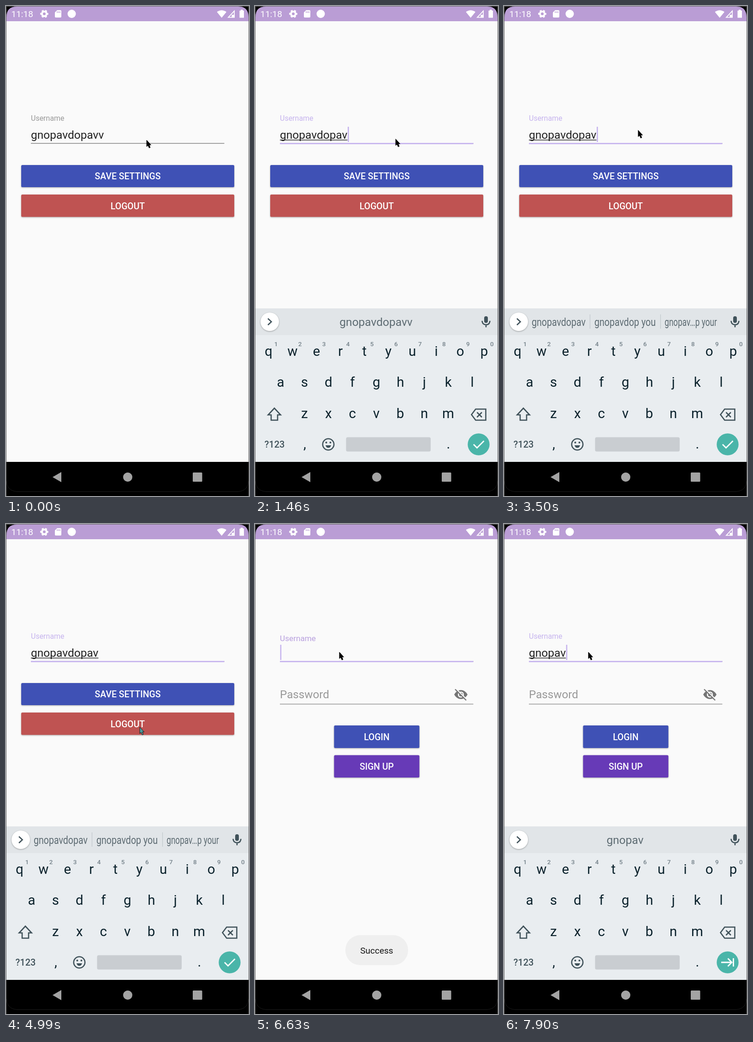
Animation of 527 by 1063 pixels, one loop 8000 ms. Source, as an HTML page:

```html
<!DOCTYPE html>
<html lang="en">
<head>
<meta charset="utf-8">
<title>Account settings</title>
<style>
  html, body { margin: 0; height: 100%; overflow: hidden; background: #000; }
  svg { display: block; width: 100%; height: 100%; font-family: Roboto, sans-serif; }
  .mid { text-anchor: middle; }
  .button { filter: drop-shadow(0 1.5px 1.5px rgba(0, 0, 0, .32)); }
  .caption { fill: #fff; font-size: 19.4px; font-weight: 500; text-anchor: middle; }
  .hint { fill: #999; font-size: 24.2px; }
  .icon { fill: none; stroke: #40525a; stroke-width: 2.6; }
  .key { fill: #0b222c; font-size: 29.5px; text-anchor: middle; }
  .digit { fill: #75828a; font-size: 13.5px; font-weight: 500; text-anchor: middle; }
  .suggestion { fill: #5d6b72; font-size: 24.5px; text-anchor: middle; }
</style>
</head>
<body>
<svg viewBox="0 0 527 1063">
  <defs>
    <clipPath id="screen"><path d="M1 1063V24Q1 1 24 1H503Q526 1 526 24V1063Z"/></clipPath>
    <clipPath id="aboveNav"><path d="M1 33H526V989H1Z"/></clipPath>
    <clipPath id="saveShape"><rect x="33" y="345" width="462" height="48" rx="2.5"/></clipPath>
    <clipPath id="logoutShape"><rect x="33" y="409" width="462" height="48.5" rx="2.5"/></clipPath>
  </defs>
  <rect width="527" height="1063"/>
  <g clip-path="url(#screen)">
    <path d="M0 0H527V511H0Z" fill="#ba9dd5"/>
    <rect id="paper" x="1" y="33" width="525" height="956" fill="#fafafa"/>

    <g id="content">
      <g id="settings">
        <rect id="save" class="button" x="33" y="345" width="462" height="48" rx="2.5" fill="#3f51b5"/>
        <rect class="button" x="33" y="409" width="462" height="48.5" rx="2.5" fill="#bf5352"/>
        <g clip-path="url(#saveShape)"><circle id="saveRipple" cx="246" cy="378" fill="#fff"/></g>
        <g clip-path="url(#logoutShape)"><circle id="logoutRipple" cx="290" cy="440" fill="#fff"/></g>
        <text class="caption" x="264" y="376.4">SAVE SETTINGS</text>
        <text class="caption" x="264" y="440.5">LOGOUT</text>
      </g>

      <g id="login">
        <text class="hint" x="54" y="377.5">Password</text>
        <path d="M54 390.6H473.5" stroke="#858585" stroke-width="1.4"/>
        <g transform="translate(446.5 370)">
          <path d="M-14.5 0Q-9-9.8 0-9.8T14.5 0Q9 9.8 0 9.8T-14.5 0Z" fill="#757575"/>
          <circle r="5.3" fill="#757575" stroke="#fafafa" stroke-width="2.6"/>
          <path d="M-11.5-13.3L13 11.2" stroke="#fafafa" stroke-width="2.6"/>
          <path d="M-12.5-11.5L11.5 12.5" stroke="#757575" stroke-width="2.4"/>
        </g>
        <rect class="button" x="171.5" y="437" width="185" height="49" rx="2.5" fill="#3f51b5"/>
        <rect class="button" x="171.5" y="501.5" width="185" height="48.5" rx="2.5" fill="#673ab7"/>
        <text class="caption" x="264" y="469.3">LOGIN</text>
        <text class="caption" x="264" y="533.4">SIGN UP</text>
      </g>

      <path d="M54 298H473.5" stroke="#858585" stroke-width="1.4"/>
      <path id="focusLine" d="M54 298.4H473.5" stroke="#c6b4ee" stroke-width="2.6"/>
      <text id="label" x="54">Username</text>
      <text id="value" x="54" y="288" fill="#212121" font-size="24.5"></text>
      <rect id="underline" x="54" y="290" height="1.4" fill="#212121"/>
      <rect id="caret" y="262" width="2.6" height="33" fill="#c6b4ee"/>
    </g>

    <g clip-path="url(#aboveNav)">
      <g id="keyboard">
        <rect x="1" y="656" width="525" height="333" fill="#e9edf0"/>
        <rect x="1" y="656" width="525" height="58" fill="#e1e5e8"/>
        <circle class="button" cx="32" cy="685" r="20" fill="#fff"/>
        <path class="icon" d="M28 678L35.5 685L28 692"/>
        <g id="strip"></g>
        <rect x="497" y="673" width="8" height="14.5" rx="4" fill="#40525a"/>
        <path class="icon" stroke-width="2" d="M492.5 683Q493 691.5 501 691.5T509.5 683M501 691V697"/>
        <g id="keys"></g>
        <path class="icon" d="M42 872.5L55.5 887H49V898.5H35V887H28.5Z"/>
        <path class="icon" d="M478.5 874.5H500.5V898.5H478.5L469.5 886.5ZM481.5 881.5L492 892M492 881.5L481.5 892"/>
        <text x="42.5" y="958" class="mid" font-size="20" font-weight="500" fill="#40525a">?123</text>
        <text class="key" x="108" y="960">,</text>
        <text class="key" x="419.5" y="960">.</text>
        <circle class="icon" cx="159" cy="951" r="12.2"/>
        <path d="M153 953H165Q163.5 958.5 159 958.5T153 953Z" fill="#40525a"/>
        <circle cx="154.5" cy="947" r="2" fill="#40525a"/>
        <circle cx="163.5" cy="947" r="2" fill="#40525a"/>
        <rect x="197.5" y="935.5" width="183.5" height="31" rx="3.5" fill="#c9cdd1"/>
        <circle cx="485" cy="951" r="23.7" fill="#4ab5a9"/>
        <path id="action" fill="none" stroke="#fff" stroke-width="2.8"/>
      </g>
    </g>

    <g id="toast">
      <rect x="196" y="892" width="136" height="65" rx="32" fill="#efefef"/>
      <text class="mid" x="264" y="932" font-size="19" fill="#161616">Success</text>
    </g>

    <g fill="#fff">
      <text x="11.5" y="24" font-size="19">11:18</text>
      <circle cx="83" cy="17" r="5" fill="none" stroke="#fff" stroke-width="4"/>
      <circle cx="83" cy="17" r="7.3" fill="none" stroke="#fff" stroke-width="3" stroke-dasharray="4 3.644" stroke-dashoffset="2"/>
      <path d="M111 9H118Q120 9 120 11V23Q120 25 118 25H108Q106 25 106 23V14Z"/>
      <path d="M111 11.5V15M114 11.5V15M117 11.5V15" stroke="#ba9dd5" stroke-width="1.4"/>
      <circle cx="142.5" cy="17" r="9"/>
      <path d="M457.5 13Q467.5 5.5 478 13L467.7 25.5Z"/>
      <path fill-rule="evenodd" d="M496 8.5V25.5H480ZM494.3 13V19H489.5V23.7H484.2Z"/>
      <path d="M509 8H513.5V10H516V25.5H506.5V10H509Z"/>
    </g>

    <rect id="nav" y="989" width="527" height="74"/>
    <g fill="#a3a3a3">
      <path d="M101 1022L120 1011V1033Z"/>
      <circle cx="264" cy="1022" r="10"/>
      <rect x="405" y="1012" width="20.5" height="20" rx="1.5"/>
    </g>
    <path d="M1 1030Q2 1052 24 1053.5H503Q525 1052 526 1030" fill="none" stroke="#1c1c1c"/>
  </g>
  <path d="M.5 1063V.5H526.5V1063" fill="none" stroke="#6a6a6a"/>
  <path id="pointer" d="M0 0V14L3 11.6L5.4 17L8 16L5.7 10.6H9.6Z" stroke="#000" stroke-width=".8"/>
</svg>

<script>
const LOOP = 8000;
const SWITCH = 5140;
const NAME = "gnopavdopavv";
const SHORT = NAME.slice(0, -1);
const ui = {};
document.querySelectorAll("[id]").forEach(node => ui[node.id] = node);

// Every track is a list of [start time, ...values]; a value holds until the next start.
const tracks = {
  pointer: [
    [0, 305, 291], [150, 305, 288.5], [1830, 300, 312], [1950, 268, 372], [2070, 246, 414],
    [2210, 245, 424], [2330, 245, 397], [2460, 246, 378], [3260, 254, 350], [3380, 276, 302],
    [3500, 291, 269.5], [3620, 295, 254], [3740, 299, 340], [3860, 291, 422], [4010, 290.5, 432],
    [4130, 290, 440.5], [5270, 285, 457.5], [5580, 252, 323], [5730, 220, 243], [5850, 197, 250],
    [6000, 183, 278]
  ],
  focus: [[0, 0], [290, .35], [410, .7], [540, 1], [SWITCH, 0], [6380, .8], [6630, 1]],
  caret: [
    [0, 0], [540, 1], [1080, 0], [1460, 1], [1950, 0], [2460, 1], [2890, 0], [3380, 1],
    [3860, 0], [4380, 1], [4990, 0], [6630, 1]
  ],
  label: [[0, 16, 249], [SWITCH, 24.2, 288], [6630, 17.2, 254], [6770, 16, 249]],
  text: [
    [0, NAME], [1460, SHORT], [SWITCH, ""],
    ...[7160, 7290, 7410, 7530, 7650, 7900].map((time, i) => [time, NAME.slice(0, i + 1)])
  ],
  keyboard: [[0, 340], [820, 90], [940, 0], [SWITCH, 340], [6770, 90], [6890, 0]],
  zoom: [[0, 1], [SWITCH, .98], [5270, .995], [5420, 1]],
  toast: [[0, 0], [5270, .72], [5420, .9], [5580, 1], [7040, .5], [7160, 0]],
  saveRipple: [[0, 0, 0], [2890, 90, .2], [3010, 200, .2], [3130, 280, .1], [3260, 0, 0]],
  logoutRipple: [[0, 0, 0], [4380, 251, .2], [4620, 0, 0]]
};

const at = (name, time) => tracks[name].findLast(step => step[0] <= time).slice(1);

function set(node, attributes) {
  for (const [key, value] of Object.entries(attributes)) node.setAttribute(key, value);
}

const show = (node, visible) => node.style.display = visible ? "" : "none";

const textTag = (kind, x, y, text) => `<text class="${kind}" x="${x}" y="${y}">${text}</text>`;

function buildKeys() {
  const rows = [["qwertyuiop", 29.5, 759], ["asdfghjkl", 55.5, 826], ["zxcvbnm", 107.3, 894]];
  const letters = rows.flatMap(([row, x, y]) =>
    [...row].map((letter, i) => textTag("key", x + 51.95 * i, y, letter)));
  const digits = [..."1234567890"].map((digit, i) => textTag("digit", 45.5 + 52.05 * i, 738, digit));
  ui.keys.innerHTML = letters.concat(digits).join("");
}

function suggestions(time, text) {
  if (time < 1580) return [NAME];
  if (time < SWITCH) return [SHORT, NAME.slice(0, 9) + " you", NAME.slice(0, 6) + "…p your"];
  if (!text) return [];
  return time < 7900 ? [text, text + "e", text + "s"] : [text];
}

let stripKey;
function drawStrip(words) {
  const key = words.join("|");
  if (key === stripKey) return;
  stripKey = key;
  if (words.length < 2) {
    ui.strip.innerHTML = words.map(word => textTag("suggestion", 262.5, 694, word)).join("");
    return;
  }
  const centers = [118.5, 262.5, 405];
  const condense = word => word.length < 10 ? 1 : word.includes("…") ? .7 : .8;
  ui.strip.innerHTML = words.map((word, i) =>
    `<g transform="translate(${centers[i]} 694) scale(${condense(word)} 1)">${textTag("suggestion", 0, 0, word)}</g>`
  ).join("") + '<path d="M186.5 669V700M339.5 669V700" stroke="#c3c9cd" stroke-width="1.3"/>';
}

function drawField(time) {
  const [focus] = at("focus", time);
  const [size, baseline] = at("label", time);
  const [text] = at("text", time);
  set(ui.label, {
    "font-size": size, y: baseline,
    fill: `color-mix(in srgb, ${size === 17.2 ? "#b8a0de" : "#c6b4ee"} ${focus * 100}%, #999)`
  });
  set(ui.focusLine, { opacity: focus });
  if (ui.value.textContent !== text) ui.value.textContent = text;
  const width = text ? ui.value.getComputedTextLength() : 0;
  const composing = time >= 1460 && text;
  set(ui.underline, { width: composing ? width : 0 });
  set(ui.caret, { x: 54.6 + width, opacity: at("caret", time)[0] });
  return text;
}

function draw(time) {
  const loggedOut = time >= SWITCH;
  const text = drawField(time);
  show(ui.settings, !loggedOut);
  show(ui.login, loggedOut);

  for (const name of ["saveRipple", "logoutRipple"]) {
    const [r, opacity] = at(name, time);
    set(ui[name], { r, opacity });
  }
  const raised = time >= 2890 && time < 3260;
  ui.save.style.filter = raised ? "drop-shadow(0 4px 3px rgba(0,0,0,.35))" : "";

  const [zoom] = at("zoom", time);
  const shift = 1 - zoom;
  set(ui.paper, { transform: `translate(0 ${511 * shift}) scale(1 ${zoom})` });
  set(ui.content, {
    transform: `translate(${264 * shift} ${511 * shift}) scale(${zoom})`,
    opacity: zoom < .99 ? .6 : 1
  });
  set(ui.nav, { y: 989 - 478 * shift, height: 74 + 478 * shift });

  set(ui.toast, { opacity: at("toast", time)[0] });
  set(ui.keyboard, { transform: `translate(0 ${at("keyboard", time)[0]})` });
  set(ui.action, {
    d: loggedOut ? "M471 951H493M485.5 942.5L494 951L485.5 959.5M497.5 942V960" : "M474 951L481.5 958.5L496.5 943.5"
  });
  drawStrip(suggestions(time, text));

  const [x, y] = at("pointer", time);
  set(ui.pointer, {
    transform: `translate(${x} ${y})`,
    fill: time >= 4010 && time < SWITCH ? "#4f9a9c" : "#000"
  });
}

buildKeys();
const start = performance.now();
function tick() {
  draw((performance.now() - start) % LOOP);
  requestAnimationFrame(tick);
}
tick();
</script>
</body>
</html>
```
